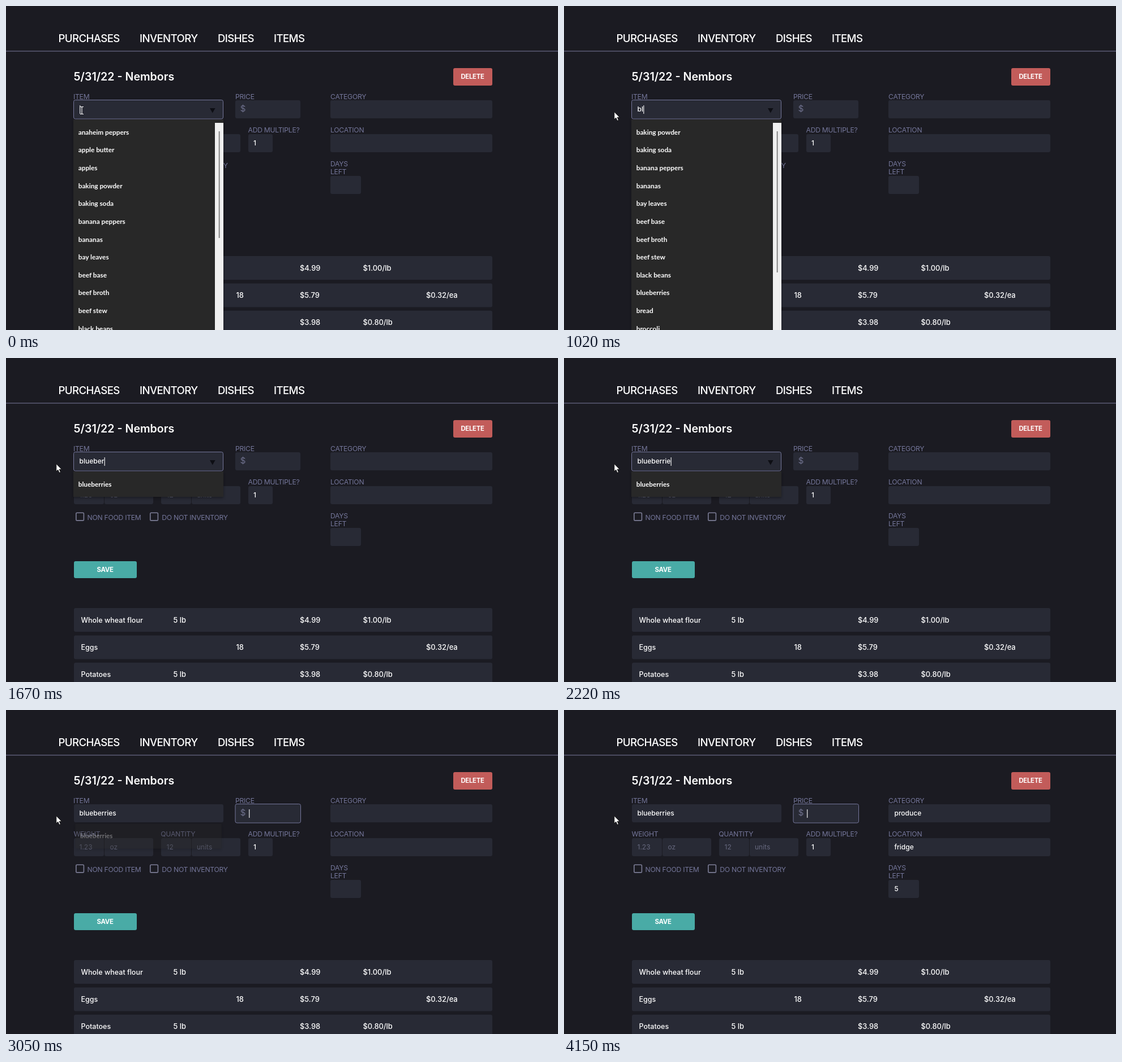
An HTML page for the animation above (4.33 s loop, 975 px wide and 574 px high).

```html
<!DOCTYPE html>
<html lang="en">
<head>
<meta charset="utf-8">
<title>Pantry purchases</title>
<style>
html, body { margin: 0; width: 100%; height: 100%; overflow: hidden; background: #1b1b22; }
svg { display: block; width: 100vw; height: 100vh; }
text { font-family: Inter, Roboto, sans-serif; fill: #fff; white-space: pre; }
.nav text { font-size: 18.6px; font-weight: 500; letter-spacing: -.6px; }
.title { font-size: 19.6px; font-weight: 600; }
.label { font-size: 12.2px; letter-spacing: -.28px; fill: #74769a; }
.value { font-size: 12px; font-weight: 500; }
.hint { font-size: 12px; fill: #66687e; }
.dollar { font-size: 15px; fill: #70728f; }
.cell { font-size: 12.9px; font-weight: 500; }
.cell.name { font-size: 12.5px; }
.button { font-size: 11.3px; font-weight: 700; letter-spacing: -.25px; text-anchor: middle; }
.field { fill: #282a35; }
.box { fill: none; stroke: #7c7d96; stroke-width: 1.6; }
.focus { fill: #282a35; stroke: #74769a; }
.caret { fill: #fff; }
.menu { filter: drop-shadow(0 2px 2px rgba(0,0,0,.35)); }
.menu text { font-family: Lato, "Open Sans", sans-serif; font-size: 11.8px; font-weight: 700; }
</style>
</head>
<body>
<svg viewBox="0 0 975 574" preserveAspectRatio="none">
  <rect width="975" height="574" fill="#1b1b22"/>
  <g class="nav">
    <text x="92.5" y="63.5">PURCHASES</text>
    <text x="236" y="63.5">INVENTORY</text>
    <text x="374" y="63.5">DISHES</text>
    <text x="473" y="63.5">ITEMS</text>
  </g>
  <rect y="79" width="975" height="2" fill="#4b4b60"/>
  <text class="title" x="119.5" y="132">5/31/22 - Nembors</text>
  <rect x="790" y="110" width="69" height="31" rx="3" fill="#c25c5a"/>
  <text class="button" x="824" y="129.3">DELETE</text>
  <rect x="120" y="360" width="111" height="30" rx="3" fill="#49aba6"/>
  <text class="button" x="175" y="379">SAVE</text>

  <g id="form"></g>
  <g id="rows"></g>

  <rect class="focus" id="itemFocus" x="119.5" y="166.5" width="264" height="33.5" rx="3"/>
  <path id="arrow" d="M360 181h9.6l-4.8 8.4z" fill="#0d0e14"/>
  <rect class="focus" id="priceFocus" x="405" y="166.5" width="115.5" height="33.5" rx="3"/>
  <text class="dollar" x="413.8" y="186.8">$</text>
  <text class="value" id="typed" x="129.5" y="187.2"></text>
  <rect class="caret" id="caret" y="176" width="1.1" height="15"/>

  <g class="menu" id="menu">
    <rect id="panel" x="119" y="201" width="265" fill="#282828"/>
    <g id="options"></g>
    <g id="scroll">
      <rect x="369" y="207" width="15" height="380" fill="#f0f0f0"/>
      <rect id="thumb" x="375.7" y="222" width="2" fill="#858585"/>
    </g>
  </g>

  <path id="beam" fill="none" stroke="#fff" stroke-width="1.1"
        d="M-3 -6.5h2l1 1 1-1h2M0 -5.5v11M-3 6.5h2l1-1 1 1h2"/>
  <path id="pointer" fill="#fff" stroke="#000" stroke-width=".8"
        d="M0 0V13.2L3 10.4 5.3 15.7 7.6 14.7 5.3 9.6H9.5Z"/>
</svg>
<script>
const LOOP = 4330;
const $ = id => document.getElementById(id);
const show = (el, on) => el.setAttribute('visibility', on ? 'visible' : 'hidden');

function add(parent, tag, attrs, text = '') {
  const el = document.createElementNS('http://www.w3.org/2000/svg', tag);
  for (const key in attrs) el.setAttribute(key, attrs[key]);
  el.textContent = text;
  parent.append(el);
  return el;
}
const form = $('form'), rows = $('rows');
const write = (parent, cls, x, y, text) => add(parent, 'text', { class: cls, x, y }, text);
const field = (x, y, width, height = 32) =>
  add(form, 'rect', { class: 'field', x, y, width, height, rx: 3 });

// Form
[[120, 167, 264], [405, 167, 115], [573, 167, 286], [573, 227, 286], [573, 301, 54],
 [120, 227, 53], [174, 227, 86], [274, 227, 53], [328, 227, 86], [428, 227, 43]]
  .forEach(f => field(...f));
[['ITEM', 119, 164.5], ['PRICE', 405, 164.5], ['CATEGORY', 573, 164.5],
 ['WEIGHT', 119.5, 224.3], ['QUANTITY', 273.3, 224.3], ['ADD MULTIPLE?', 427.5, 224.3],
 ['LOCATION', 573, 224.3], ['DAYS', 573, 284.3], ['LEFT', 573, 298.3],
 ['NON FOOD ITEM', 143.5, 286.7], ['DO NOT INVENTORY', 275.3, 286.7]]
  .forEach(([text, x, y]) => write(form, 'label', x, y, text));
[['1.23', 129.5], ['oz', 183.5], ['12', 283.5], ['units', 337]]
  .forEach(([text, x]) => write(form, 'hint', x, 247.2, text));
[123.8, 254.8].forEach(x =>
  add(form, 'rect', { class: 'box', x, y: 274.3, width: 13.6, height: 13.6, rx: 1.5 }));
write(form, 'value', 437, 247.2, '1');
const filled = [['produce', 187.2], ['fridge', 247.2], ['5', 320.8]]
  .map(([text, y]) => write(form, 'value', 583.5, y, text));

// Purchase list
const columns = [132.5, 295.5, 406.5, 519, 630.5, 742];
[['Whole wheat flour', '5 lb', '', '$4.99', '$1.00/lb', ''],
 ['Eggs', '', '18', '$5.79', '', '$0.32/ea'],
 ['Potatoes', '5 lb', '', '$3.98', '$0.80/lb', '']].forEach((cells, i) => {
  const y = 443 + i * 48.4;
  add(rows, 'rect', { class: 'field', x: 120, y, width: 739, height: 42, rx: 3 });
  cells.forEach((text, c) => write(rows, c ? 'cell' : 'cell name', columns[c], y + 25.5, text));
});

// Suggestions
const all = ['anaheim peppers', 'apple butter', 'apples', 'baking powder', 'baking soda',
  'banana peppers', 'bananas', 'bay leaves', 'beef base', 'beef broth', 'beef stew',
  'black beans', 'blueberries', 'bread', 'broccoli'];
const slots = Array.from({ length: 12 }, (_, i) => write($('options'), '', 127.7, 227.6 + i * 31.65, ''));

// Each step is [start time, value...]
const keyTimes = [870, 1000, 1120, 1200, 1400, 1520, 1670, 1910, 2090, 2200, 2300];
const filters = [[0, ''], [900, 'b'], [1030, 'bl'], [1140, 'blu']];
const heights = [[0, 380], [1030, 80], [1420, 45]];
const mouse = [[0, 134, 185], [60, 129, 185], [110, 112, 186], [170, 96, 187], [230, 88.8, 187.6]];
const current = (steps, t) => steps.filter(([at]) => at <= t).pop().slice(1);

function draw(t) {
  const inPrice = t >= 2690;
  const typed = 'blueberries'.slice(0, keyTimes.filter(k => k <= t).length);
  $('typed').textContent = typed;
  show($('itemFocus'), !inPrice);
  show($('arrow'), !inPrice);
  show($('priceFocus'), inPrice);

  const end = typed ? $('typed').getComputedTextLength() : 0;
  $('caret').setAttribute('x', inPrice ? 429.2 : typed ? 129.8 + end : 130.2);
  show($('caret'), !(t >= 460 && t < 870) && !(t >= 3630 && t < 4150));

  const [prefix] = current(filters, t);
  const [height] = current(heights, t);
  const names = all.filter(name => name.startsWith(prefix));
  slots.forEach((slot, i) => slot.textContent = names[i] || '');
  $('panel').setAttribute('height', height);
  show($('scroll'), height > 100);
  $('thumb').setAttribute('height', prefix ? 250 : 189);

  // The list fades and shrinks slightly once focus leaves it
  const out = Math.min(1, Math.max(0, (t - 2790) / 420));
  const scale = 1 - .043 * out;
  $('menu').setAttribute('opacity', inPrice ? .97 * (1 - out) : 1);
  $('menu').setAttribute('transform', `translate(251.5 223.5) scale(${scale}) translate(-251.5 -223.5)`);

  filled.forEach(el => show(el, t >= 3310));

  const [x, y] = current(mouse, t);
  const overField = x > 119;
  show($('beam'), overField);
  show($('pointer'), !overField);
  $(overField ? 'beam' : 'pointer').setAttribute('transform', `translate(${x} ${y})`);
}

const start = performance.now();
function tick() {
  draw((performance.now() - start) % LOOP);
  requestAnimationFrame(tick);
}
tick();
</script>
</body>
</html>
```
